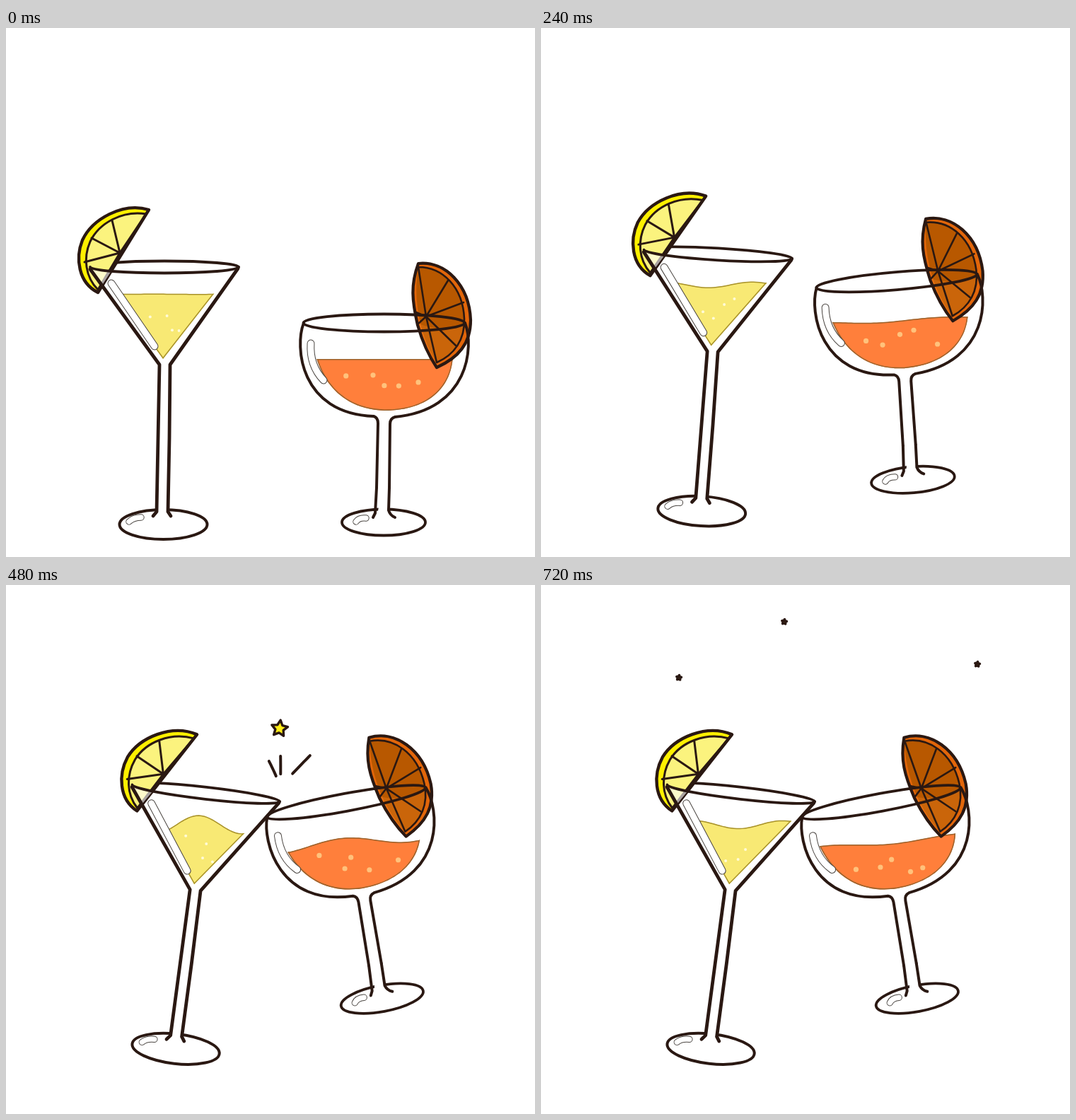
An HTML page with a canvas that plays this animation: 748 by 748 pixels, repeating every 0.8 s.

```html
<!DOCTYPE html>
<html lang="en">
<head>
<meta charset="utf-8">
<title>Cheers</title>
<style>
html, body { margin: 0; width: 100%; height: 100%; overflow: hidden; background: #fff; }
canvas { display: block; }
</style>
</head>
<body>
<canvas id="stage" width="748" height="748"></canvas>
<script>
const ctx = document.getElementById('stage').getContext('2d');
const INK = '#2a1812';
const STEP = 80;
const LOOP = 800;

const rad = deg => deg * Math.PI / 180;
const mix = (a, b, f) => a + (b - a) * f;

// Repeatable random number in 0..1.
function noise(seed) {
  const v = Math.sin(seed * 12.9898 + 4.1) * 43758.5453;
  return v - Math.floor(v);
}

// Key poses: time, pivot x, pivot y, tilt in degrees.
// The crest of the wave passes the middle of the liquid and travels with `drift`.
const martini = {
  keys: [
    [0, 221, 417.75, 0], [160, 227.5, 410.5, 0.6], [240, 242.6, 399.25, 3.4],
    [320, 261, 387.75, 5.8], [480, 270.75, 373.25, 6.5]
  ],
  bowl: 'M130 340L222 468L322 340Z',
  level: [-42, -35], half: 62, shift: 10, depth: 85, taper: 1,
  wave: 13, crest: -0.14, drift: -0.0037, lean: 0,
  bubbles: 4, bubbleSize: 2,
  fill: '#f8e974', edge: '#a8922c', bubble: '#fffbd8',
  draw: drawMartini
};

const coupe = {
  keys: [
    [0, 536.75, 482, 0], [160, 528.5, 467, -3.7], [240, 510.5, 422.25, -4.8],
    [320, 496, 394.5, -6.7], [480, 495, 370.75, -10.5]
  ],
  bowl: 'M434 440C436 470 455 538 535 541C600 541 634 505 632 455Z',
  level: [-14, -8], half: 93, shift: 0, depth: 62, taper: 0.4,
  wave: 7, crest: -0.2, drift: 0.005, lean: 0.5,
  bubbles: 5, bubbleSize: 3.6,
  fill: '#ff7f3b', edge: '#99622c', bubble: '#ffc27c',
  draw: drawCoupe
};

// Each spark flies from the clink along a curve: bend point, end point.
const CLINK = [388, 285];
const SPARKS = [
  { bend: [328, 132], end: [195, 131], appears: 0.4 },
  { bend: [392, 105], end: [344, 52], appears: 0.2 },
  { bend: [563, 97], end: [617, 112], appears: 0.4 }
];

// Eases into the first stretch and out of the last one.
function poseAt(keys, t) {
  const last = keys.length - 1;
  const i = Math.min(keys.findLastIndex(key => key[0] <= t), last - 1);
  const f = Math.min((t - keys[i][0]) / (keys[i + 1][0] - keys[i][0]), 1);
  const eased = i === 0 ? f ** 3 : i === last - 1 ? 1 - (1 - f) ** 3 : f;
  const [, x, y, tilt] = keys[i].map((v, n) => mix(v, keys[i + 1][n], eased));
  return { x, y, tilt };
}

function line(d, width = 4, color = INK) {
  ctx.strokeStyle = color;
  ctx.lineWidth = width;
  ctx.stroke(new Path2D(d));
}

function area(d, color) {
  ctx.fillStyle = color;
  ctx.fill(new Path2D(d));
}

function oval(x, y, rx, ry, width, from = 0, to = Math.PI * 2) {
  ctx.beginPath();
  ctx.ellipse(x, y, rx, ry, 0, from, to);
  ctx.strokeStyle = INK;
  ctx.lineWidth = width;
  ctx.stroke();
}

function shine(d, width) {
  line(d, width + 1.4, '#4a4541');
  line(d, width - 0.6, '#fff');
}

function enterGlass(glass, pose) {
  const [, ox, oy] = glass.keys[0];
  ctx.translate(pose.x, pose.y);
  ctx.rotate(rad(pose.tilt));
  ctx.translate(-ox, -oy);
}

// Height of the sloshing liquid; the swell peaks around the clink.
function surfaceY(glass, pose, t, dx) {
  const swell = glass.wave * Math.exp(-(((t - 500) / 240) ** 2));
  const crest = glass.crest + glass.drift * (t - 480);
  const level = mix(...glass.level, Math.min(t / 320, 1));
  return pose.y + level + dx * Math.tan(rad(pose.tilt * glass.lean))
    - swell * Math.cos(Math.PI * (dx / glass.half - crest));
}

function drawLiquid(glass, pose, t) {
  const bowl = new Path2D(glass.bowl);
  const liquid = new Path2D();
  const middle = pose.x + glass.shift;
  for (let dx = -120; dx <= 120; dx += 4) {
    liquid.lineTo(middle + dx, surfaceY(glass, pose, t, dx));
  }
  liquid.lineTo(middle + 120, 748);
  liquid.lineTo(middle - 120, 748);
  liquid.closePath();

  ctx.save();
  ctx.save();
  enterGlass(glass, pose);
  const inside = ctx.getTransform();
  ctx.restore();
  ctx.setTransform(inside);
  ctx.clip(bowl);
  ctx.resetTransform();
  ctx.clip(liquid);
  ctx.fillStyle = glass.fill;
  ctx.fill(liquid);
  ctx.strokeStyle = glass.edge;
  ctx.lineWidth = 3;
  ctx.stroke(liquid);
  ctx.setTransform(inside);
  ctx.stroke(bowl);
  ctx.restore();

  ctx.fillStyle = glass.bubble;
  for (let i = 0; i < glass.bubbles; i++) {
    const seed = t / STEP * 10 + i;
    const depth = mix(0.18, 0.72, noise(seed));
    const side = (i + noise(seed + 0.5)) / glass.bubbles * 2 - 1;
    const dx = side * 0.8 * glass.half * (1 - depth) ** glass.taper;
    ctx.beginPath();
    ctx.arc(middle + dx, surfaceY(glass, pose, t, dx) + depth * glass.depth, glass.bubbleSize, 0, Math.PI * 2);
    ctx.fill();
  }
}

function drawMartini() {
  const rind = 'M202 257C165 246 122 270 108 300C98 325 102 360 130 374Z';
  const flesh = 'M198 263C165 258 132 275 119 302C109 325 112 352 130 370L161 318Z';
  oval(224, 338, 105, 8.5, 3.8, Math.PI, Math.PI * 2);
  area(rind, '#fff000');
  area(flesh, '#fbf37e');
  line(flesh, 3);
  line(rind, 4.4);
  line('M161 318L150 272M161 318L121 297M161 318L111 331', 3);
  area('M119 341L148 345L135 365Z', 'rgba(255,255,255,.6)');
  oval(224, 338, 105, 8.5, 3.8, 0, Math.PI);

  oval(222.5, 702, 62, 21, 4);
  area('M217 477L232 477L231 689L211 689Z', '#fff');
  line('M119 341L217 476L215 580L213 684L208 690', 4.8);
  line('M328 340L232 476L231 580L229 684L233 690', 4.8);
  shine('M149 361L210 450', 9.5);
  shine('M174 698Q180 692 191 692', 8);
}

function drawCoupe() {
  const rind = 'M583 333C572 363 574 385 582 420Q592 455 609 480C640 466 657 446 657 413C655 363 621 329 583 333Z';
  area(rind, '#e2660a');
  area('M583 338C576 375 582 432 609 473C634 462 649 441 648 411C646 366 617 338 583 338Z', '#b85800');
  area('M583 418Q620 432 648 418Q648 458 609 473Q591 450 583 418Z', 'rgba(255,140,40,.25)');
  line(rind, 4.2);
  line('M583 338L594 408L609 473C634 462 649 441 648 411C646 366 617 338 583 338', 2.6);
  line('M594 408L625 357M594 408L647 388M594 408L636 449M580 402L594 408L583 418', 2.6);

  oval(534.5, 417, 114, 12.5, 3.8);
  line('M421 417C408 450 415 545 520 549Q526 551 526 559L524 650', 4);
  line('M649 417C662 450 655 540 550 550Q543 552 543 560L542 650', 4);
  oval(534, 699, 59, 18.5, 3.8);
  area('M528 672L540 672L539 688L525 688Z', '#fff');
  line('M524 650L522 686L519 692M542 650L541 682Q543 689 550 692', 4);
  shine('M431 446Q429 477 449 498', 9.5);
  shine('M495 698Q499 692 509 693', 8);
}

function drawGlass(glass, t) {
  const pose = poseAt(glass.keys, t);
  drawLiquid(glass, pose, t);
  ctx.save();
  enterGlass(glass, pose);
  glass.draw();
  ctx.restore();
}

function drawStar([x, y], r) {
  ctx.beginPath();
  for (let i = 0; i < 10; i++) {
    const a = i * Math.PI / 5 - 1.45;
    const d = i % 2 ? r * 0.5 : r;
    ctx.lineTo(x + d * Math.cos(a), y + d * Math.sin(a));
  }
  ctx.closePath();
  ctx.fillStyle = '#ffed18';
  ctx.fill();
  ctx.strokeStyle = INK;
  ctx.lineWidth = 3.4;
  ctx.stroke();
}

function drawSpark({ bend, end, appears }, u) {
  const at = p => CLINK.map((c, n) => mix(mix(c, bend[n], p), mix(bend[n], end[n], p), p));
  if (u < 1) {
    const tail = 0.8 * u * u, head = u ** 1.5;
    ctx.beginPath();
    for (let i = 0; i <= 8; i++) ctx.lineTo(...at(mix(tail, head, i / 8)));
    ctx.strokeStyle = INK;
    ctx.lineWidth = 4;
    ctx.stroke();
  }
  if (u > appears) drawStar(at(u), 12 * (1 - 0.7 * u ** 4));
}

const start = performance.now();

function render() {
  const t = Math.floor((performance.now() - start) % LOOP / STEP) * STEP;
  const flight = (t - 400) / 320;
  ctx.fillStyle = '#fff';
  ctx.fillRect(0, 0, 748, 748);
  ctx.lineCap = ctx.lineJoin = 'round';
  drawGlass(martini, t);
  drawGlass(coupe, t);
  if (flight > 0) SPARKS.forEach(spark => drawSpark(spark, flight));
  requestAnimationFrame(render);
}
render();
</script>
</body>
</html>
```
